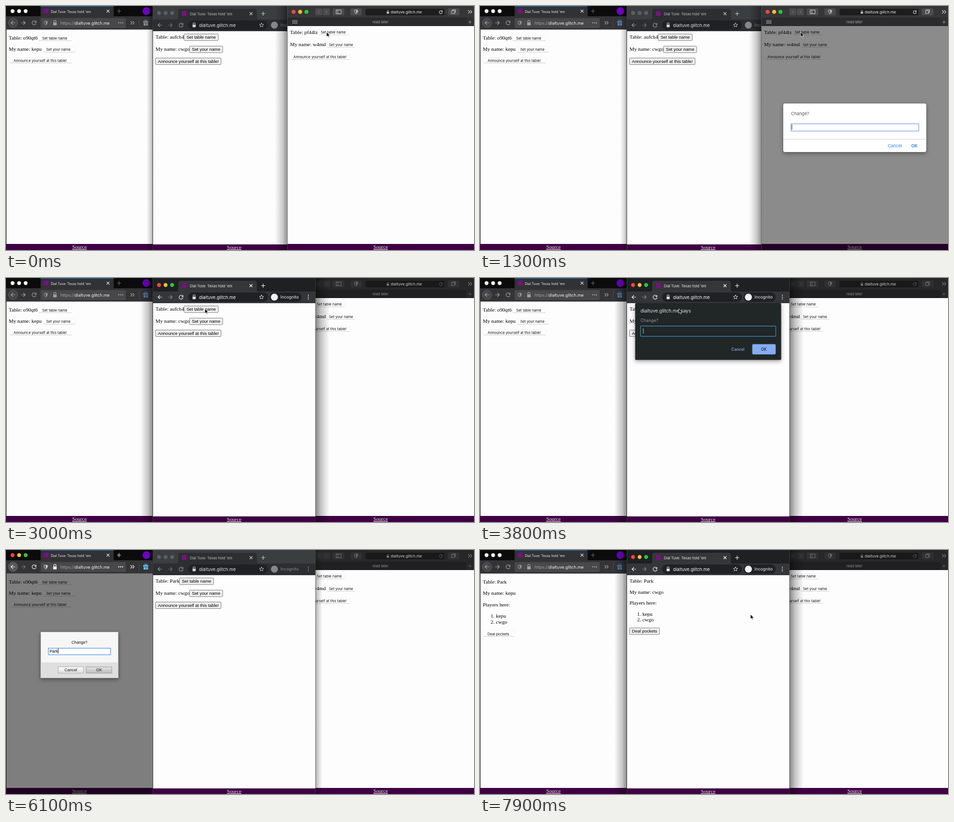
Write an HTML page that moves like this. It is 1000 px wide and 523 px high and loops after 8000 ms.

```html
<!DOCTYPE html>
<html lang="en">
<head>
<meta charset="utf-8">
<title>Three browsers at one table</title>
<style>
html, body { margin: 0; width: 100%; height: 100%; overflow: hidden; background: #000; }
svg { display: block; width: 100vw; height: 100vh; }
text { white-space: pre; }
.ui { font-family: Inter, "Open Sans", sans-serif; }
.serif { font-family: "Liberation Serif", serif; }
.sans { font-family: "Liberation Sans", sans-serif; }
</style>
</head>
<body>
<svg id="stage" viewBox="0 0 1000 523" xmlns="http://www.w3.org/2000/svg">
  <defs>
    <linearGradient id="shadeRight">
      <stop offset="0" stop-opacity="1"/><stop offset=".4" stop-opacity=".46"/><stop offset="1" stop-opacity="0"/>
    </linearGradient>
    <linearGradient id="shadeLeft" x1="1" x2="0">
      <stop offset="0" stop-opacity="1"/><stop offset=".4" stop-opacity=".46"/><stop offset="1" stop-opacity="0"/>
    </linearGradient>
    <linearGradient id="metal" x2="0" y2="1">
      <stop offset="0" stop-color="#fff"/><stop offset="1" stop-color="#dcdcdc"/>
    </linearGradient>
    <linearGradient id="metalDark" x2="0" y2="1">
      <stop offset="0" stop-color="#e4e4e4"/><stop offset="1" stop-color="#bdbdbd"/>
    </linearGradient>
    <filter id="drop" x="-10%" y="-20%" width="120%" height="150%" color-interpolation-filters="sRGB">
      <feDropShadow dx="0" dy="3" stdDeviation="4" flood-opacity=".38"/>
    </filter>
  </defs>
  <g id="scene"></g>
</svg>
<script>
const LOOP = 8000, STEP = 100;
const TITLE = "Dial Tuve: Texas hold 'em", HOST = "dialtuve.glitch.me";
const PLAYERS = { firefox: "kepu", chrome: "cwgo", safari: "w4md" };
const PAGE = "#fdfdfd";
const scene = document.getElementById("scene");

// Drawing helpers
const rect = (x, y, w, h, fill, more = "") =>
  `<rect x="${x}" y="${y}" width="${w}" height="${h}" fill="${fill}" ${more}/>`;
const circle = (x, y, r, fill, more = "") =>
  `<circle cx="${x}" cy="${y}" r="${r}" fill="${fill}" ${more}/>`;
const line = (d, color, width = 1.2, more = "") =>
  `<path d="${d}" fill="none" stroke="${color}" stroke-width="${width}" ${more}/>`;
const text = (x, y, s, size, fill, font = "ui", more = "") =>
  `<text x="${x}" y="${y}" font-size="${size}" fill="${fill}" class="${font}" ${more}>${s}</text>`;
const fade = (opacity, s) => `<g opacity="${opacity}">${s}</g>`;
const middle = 'text-anchor="middle"';

// Icons
const arrow = (x, y, dir, c) =>
  line(`M${x - 4.5 * dir} ${y}H${x + 4 * dir}M${x} ${y - 4}L${x + 4.3 * dir} ${y}L${x} ${y + 4}`, c);
const reload = (x, y, r, c) =>
  line(`M${x + r * .8} ${y - r * .6}A${r} ${r} 0 1 0 ${x + r} ${y + 1}M${x + r} ${y - r}v${r * .8}h${-r * .8}`, c);
const cross = (x, y, r, c) =>
  line(`M${x - r} ${y - r}l${2 * r} ${2 * r}m0 ${-2 * r}l${-2 * r} ${2 * r}`, c);
const plus = (x, y, r, c) => line(`M${x - r} ${y}h${2 * r}M${x} ${y - r}v${2 * r}`, c);
const chevrons = (x, y, c) =>
  line(`M${x - 4} ${y - 3.5}l3.5 3.5l-3.5 3.5m4.5 -7l3.5 3.5l-3.5 3.5`, c);
const lock = (x, y, s, c) =>
  rect(x - 3 * s, y - s, 6 * s, 5 * s, c, 'rx=".6"') +
  line(`M${x - 2 * s} ${y - s}v${-1.5 * s}a${2 * s} ${2 * s} 0 0 1 ${4 * s} 0v${1.5 * s}`, c, s);
const shield = (x, y, c) =>
  line(`M${x} ${y - 4.5}l3.8 1.2c0 4 -1 6 -3.8 7.8c-2.8 -1.8 -3.8 -3.8 -3.8 -7.8z`, c, 1) +
  `<path d="M${x} ${y - 3.5}v6.5c2 -1.5 2.7 -3 2.7 -5.7z" fill="${c}"/>`;
const star = (x, y, c) => {
  const points = Array.from({ length: 10 }, (_, i) => {
    const a = i * Math.PI / 5, r = i % 2 ? 2.2 : 4.8;
    return `${x + r * Math.sin(a)},${y - r * Math.cos(a)}`;
  });
  return `<polygon points="${points.join(" ")}" fill="none" stroke="${c}"/>`;
};
const lights = (xs, y, r, active, idle) =>
  xs.map((x, i) => circle(x, y, r, active ? ["#fc4640", "#fdbc2e", "#28c840"][i] : idle)).join("");
const pointer = (x, y) =>
  `<path transform="translate(${x} ${y})" d="M0 0V9.8L2.3 7.8L3.9 11.3L5.4 10.6L3.9 7.3H7z"
    fill="#000" stroke="#fff" stroke-width=".7"/>`;

function sideShade(x, width, opacity, side) {
  const left = side === "Left" ? x - width : x;
  return rect(left, 0, width, 523, `url(#shade${side})`, `opacity="${opacity}"`);
}

// Page parts
const words = (x, y, s) => text(x, y, s, 11.2, "#000", "serif");
const footer = (x, y, w, mid) =>
  rect(x, y, w, 523 - y, "#400044") +
  text(mid, y + 10, "Source", 11.2, "#f0e6f2", "serif", middle + ' text-decoration="underline"');
const softButton = (x, y, w, label, pad) =>
  rect(x, y, w, 11, "#fff", 'rx="2" stroke="#ededed" stroke-width=".7"') +
  line(`M${x + 1} ${y + 11.2}h${w - 2}`, "#c4c4c4", .8) +
  text(x + pad, y + 8.5, label, 7.6, "#111");
const hardButton = (x, y, w, label) =>
  rect(x + .5, y + .5, w - 1, 14, "#efefef", 'rx="1.5" stroke="#777"') +
  text(x + w / 2, y + 10.7, label, 9.33, "#000", "sans", middle);
const numbered = (x, y, gap, names) =>
  names.map((name, i) => words(x, y + gap * i, `${i + 1}. ${name}`)).join("");

// Typed word followed by a caret; widths in em by letter count
const typedWidth = s => [0, .667, 1.223, 1.556, 2.056][s.length];
const entry = (x, y, s, size, c) =>
  text(x, y, s, size, c, "sans") + rect(x + typedWidth(s) * size, y - 9, .9, 11, c);

function firefox(s) {
  const on = s.front === "firefox", ink = on ? "#f4f4f5" : "#a2a2a5";
  let out = rect(0, 0, 314, 523, "#0b0b0c") +
    lights([14, 28, 42], 11, 4.2, on, "#f2f2f2") +
    rect(74, 0, 156, 22, "#323235") + rect(74, 0, 156, 1, "#0a7cf0") +
    rect(81, 6, 10, 10, "#7a1080") +
    text(96, 14.5, TITLE, 7.1, "#f2f2f2") + cross(218, 11, 3.2, "#eee") +
    plus(241.5, 11, 4.5, on ? "#ddd" : "#6a6a6c") + circle(300, 11, 8.2, "#6f00c8") +
    rect(0, 22, 314, 28.5, "#343437") +
    circle(15, 36, 10, on ? "#57575a" : "#464649", 'stroke="#68686b" stroke-width=".8"') +
    arrow(15, 36, -1, ink) + arrow(37, 36, 1, on ? "#78787b" : ink) + reload(60, 36, 4.3, ink) +
    rect(74, 26, 182, 21, "#48484b", 'rx="2"') +
    shield(85, 36.5, ink) + line("M95.5 31v11", "#68686b", .8) + lock(104.5, 36.5, 1.25, ink) +
    text(116, 39.7, `https://<tspan fill="#f5f5f5">${HOST}</tspan>`, 9, "#a5a5a8") +
    [241, 245, 249].map(x => circle(x, 36, 1.3, ink)).join("") +
    chevrons(270, 36, ink) + line("M284.5 27v18", "#515154", .8);
  const gift = on ? "#62c4ff" : s.t < 1300 ? "#888c92" : "#4f7fae";
  out += rect(293, 32.5, 11, 3, gift) + rect(294, 36.5, 4.3, 5.5, gift) + rect(299.3, 36.5, 4, 5.5, gift) +
    line("M298.5 32l-3 -2.5m3.5 2.5l3 -2.5", gift);
  out += rect(1, 50.5, 312.5, 460, PAGE) +
    words(6, 72, `Table: ${s.firefoxTable}`) + words(6, 96, `My name: ${PLAYERS.firefox}`);
  if (s.firefoxPlayers.length) {
    const bottom = 174 - 13 * (2 - s.firefoxPlayers.length);
    out += words(6, 121, "Players here:") + numbered(22.8, 145, 13, s.firefoxPlayers) +
      softButton(6.5, bottom, 67, "Deal pockets", 9.5);
  } else {
    out += softButton(s.firefoxTable === "Park" ? 59 : 69, 63, 72, "Set table name", 8.3) +
      softButton(78.5, 87.7, 70, "Set your name", 7.5) +
      softButton(7, 111, 134, "Announce yourself at this table!", 9.3);
  }
  out += footer(0, 510, 314, 157);
  if (s.firefoxDialog) {
    out += rect(1, 50.5, 312.5, 472.5, "#000", 'opacity=".5"') + fade(s.firefoxDialog,
      rect(74, 175.5, 166, 99, "#f6f6f6", 'stroke="#777" stroke-width=".6" filter="url(#drop)"') +
      rect(74, 241, 166, 33, "#dfdfdf") +
      text(157, 200.5, "Change?", 8.4, "#111", "sans", middle) +
      rect(90.5, 210.5, 133, 14, "#fff", 'stroke="#4c98e6" stroke-width="1.3"') +
      entry(93, 220, s.firefoxTyped, 8.8, "#000") +
      rect(111.5, 250.5, 54, 13.5, "url(#metal)", 'stroke="#999" stroke-width=".8"') +
      rect(171.5, 250.5, 54.5, 13.5, "url(#metalDark)", 'stroke="#858585" stroke-width=".8"') +
      text(138.5, 260, "Cancel", 8.6, "#111", "sans", middle) +
      text(199, 260, "OK", 8.6, "#111", "sans", middle));
  }
  return out + rect(313.3, 0, .9, 523, "#333");
}

function chrome(s) {
  const on = s.front === "chrome", ink = on ? "#f1f3f4" : "#96999c";
  const bar = on ? "#35363a" : "#2c2e31";
  let out = sideShade(314, on ? 27 : 14, on ? .45 : .32, "Left") +
    sideShade(661, on ? 30 : 15, on ? .48 : .35, "Right") +
    rect(314, 0, 347, 523, on ? "#1f2023" : "#3b3e41") +
    lights([327, 341, 355], 15, 4.2, on, "#5d6063") +
    `<path d="M364 29q4 0 4 -4V11q0 -5 5 -5H531q5 0 5 5V25q0 4 4 4z" fill="${bar}"/>` +
    rect(376, 11, 10, 10, "#7a1080") +
    text(393, 19.5, TITLE, 7.55, on ? "#eee" : "#bdbfc1") +
    cross(523.5, 16.5, 3, on ? "#fff" : "#c8cacc") + plus(549.5, 16.5, 4.3, on ? "#fff" : "#c8cacc") +
    rect(314, 29, 347, 25, bar) +
    arrow(329, 41, -1, ink) + arrow(351, 41, 1, on ? "#85888b" : "#707376") + reload(374, 41, 4.2, ink) +
    rect(389, 31, 171, 20, on ? "#202124" : "#1f2124", 'rx="10"') +
    lock(402, 41, 1.1, on ? "#e0e0e0" : "#d5d7d9") + text(412.5, 44.6, HOST, 9.45, on ? "#fff" : "#e4e6e8") +
    star(546, 41, on ? "#ddd" : "#c4c6c8") +
    rect(563, 31, 69, 20, on ? "#202124" : bar, 'rx="10"') + circle(573.5, 41, 7.5, on ? "#f1f3f4" : "#85888b") +
    text(586.5, 44.4, "Incognito", 8.9, on ? "#f1f3f4" : "#85888b") +
    [37, 41, 45].map(y => circle(646, y, 1.1, ink)).join("") +
    rect(314, 54, 347, 457, PAGE);
  const me = PLAYERS.chrome;
  if (s.chromePlayers.length) {
    out += words(319.5, 69.7, `Table: ${s.chromeTable}`) + words(319.5, 93.5, `My name: ${me}`) +
      words(319.5, 117, "Players here:") + numbered(335.7, 140.5, 12.7, s.chromePlayers) +
      hardButton(319, 166.5, 65, "Deal pockets");
  } else {
    out += words(319.5, 70.3, `Table: ${s.chromeTable}`) + words(319.5, 96.3, `My name: ${me}`) +
      hardButton(s.chromeTable === "Park" ? 370 : 380, 59.5, 74, "Set table name") +
      hardButton(391.5, 85.5, 72, "Set your name") +
      hardButton(319, 111, 141, "Announce yourself at this table!");
  }
  out += footer(314, 511, 347, 487.5);
  if (s.chromeDialog) {
    out += fade(s.chromeDialog,
      rect(331.5, 54, 312, 121.5, "#212627", 'rx="2" filter="url(#drop)"') +
      text(343, 73.5, HOST + " says", 10, "#e4e6e8") + text(343, 94, "Change?", 9.1, "#92979b") +
      rect(343, 103, 289, 22, "#212627", 'rx="1.5" stroke="#3a87b0" stroke-width="1.4"') +
      entry(348.5, 117, s.chromeTyped, 9.4, "#e4e4e4") +
      text(551, 156, "Cancel", 8.3, "#7b9fdc", "ui", middle + ' font-weight="600"') +
      rect(582, 142, 49.5, 21.5, "#86acf2", 'rx="2" stroke="#5f93c4"') +
      text(606.5, 156, "OK", 8.3, "#26384f", "ui", middle + ' font-weight="600"'));
  }
  return out + line("M313.9 0V523M661.2 0V523", "#555", .6);
}

function safari(s) {
  const on = s.front === "safari", ink = on ? "#d5d5d5" : "#777";
  const key = on ? "#4b4b4d" : "#303032";
  const pill = (x, w) => rect(x, 5, w, 15, key, 'rx="2.5"');
  let out = (on ? sideShade(601, 26, .42, "Left") : "") +
    rect(601, 0, 399, 26, on ? "#363638" : "#272729") + rect(601, 26, 399, 17, on ? "#2b2b2d" : "#202022") +
    line("M601 26h399", "#1c1c1d", .8) +
    lights([614.5, 628.5, 642], 12.5, 4.3, on, "#4a4a4a") +
    pill(661, 15) + pill(677, 15) + line("M670 9.5l-3 3l3 3M683 9.5l3 3l-3 3", on ? "#858585" : "#555", 1) +
    pill(698, 25) + rect(705.5, 8.5, 10.5, 8, "none", `stroke="${ink}"`) + line("M709 8.5v8", ink, 1) +
    pill(736, 24) + shield(748, 12.5, ink) +
    rect(768, 6, 169, 14, on ? "#1d1d1e" : "#19191a", 'rx="3"') +
    lock(816, 13, .85, on ? "#c4c4c4" : "#777") + text(822, 16, HOST, 8, on ? "#f0f0f0" : "#d2d2d2") +
    reload(929, 13, 3.3, on ? "#ccc" : "#4a4a4a") +
    pill(944, 25) + rect(952, 10, 6.5, 6, "none", `stroke="${ink}"`) +
    line("M954 9.5v-1.5h6.5v6h-2", ink, 1) + chevrons(991.5, 12.5, ink) +
    rect(984, 26, 16, 17, on ? "#303032" : "#272729") + plus(991.5, 34.5, 3.5, on ? "#929292" : "#555");
  for (let i = 0; i < 12; i++)
    out += rect(612 + i % 4 * 2.9, 30.5 + Math.floor(i / 4) * 2.9, 1.6, 1.6, ink);
  out += text(800, 37, "read later", 7.6, on ? "#aaa" : "#8e8e8e", "ui", middle) +
    rect(601, 43, 399, 467.5, PAGE) +
    words(607, 60, `Table: ${s.safariTable}`) + words(607, 86, `My name: ${PLAYERS.safari}`) +
    softButton(s.safariTable === "Park" ? 659.5 : 668, 50.7, 64.5, "Set table name", 4.4) +
    softButton(685.5, 77.3, 61.5, "Set your name", 4.4) +
    softButton(609, 103.5, 125, "Announce yourself at this table!", 5) +
    footer(601, 510, 399, 800.5);
  if (s.safariDialog) {
    out += fade(s.safariDialog,
      rect(601, 43, 399, 480, "#000", 'opacity=".45"') +
      rect(648, 209, 305.5, 104, "#fff", 'rx="4" filter="url(#drop)"') +
      text(664.5, 234, "Change?", 9.3, "#555") +
      rect(664.5, 252.5, 273, 15.5, "#fff", 'stroke="#6f97d8" stroke-width="1.2"') +
      entry(666, 263, s.safariTyped, 9.3, "#111") + line("M648 285.5h305.5", "#c9c9c9", .9) +
      text(886.5, 303, "Cancel", 9.3, "#2a86ee", "ui", middle) +
      text(928.3, 303, "OK", 9.3, "#1d7df0", "ui", middle + ' font-weight="600"'));
  }
  return out + rect(600.8, 0, .8, 523, "#555");
}

const between = (t, a, b) => t >= a && t < b;
const appear = (t, a, b) => between(t, a, b) ? (t < a + STEP ? .55 : 1) : 0;
const typed = (t, start) => t < start ? "" : t < start + 100 ? "P" : t < start + 200 ? "Par" : "Park";

// Pointer path: time, x, y
const PATH = [
  [0, 685, 56], [2400, 685, 56], [2800, 425, 66], [4500, 425, 66], [4900, 221, 98],
  [5100, 221, 98], [5400, 124, 70], [6400, 124, 70], [6700, 80, 114],
  [7100, 80, 114], [7400, 400, 117], [7500, 400, 117], [7900, 578, 138]
];
const HIDDEN = [[1500, 2400], [4100, 4500], [6000, 6400]];

function pointerAt(t) {
  if (HIDDEN.some(([a, b]) => between(t, a, b))) return "";
  const i = PATH.findIndex(p => p[0] > t);
  if (i < 0) return pointer(...PATH[PATH.length - 1].slice(1));
  const [t0, x0, y0] = PATH[i - 1], [t1, x1, y1] = PATH[i];
  const k = (t - t0) / (t1 - t0), e = k * k * (3 - 2 * k);
  return pointer(x0 + (x1 - x0) * e, y0 + (y1 - y0) * e);
}

function stateAt(t) {
  const { firefox: first, chrome: second } = PLAYERS;
  return {
    t,
    front: t < 2800 ? "safari" : between(t, 5300, 7300) ? "firefox" : "chrome",
    safariDialog: appear(t, 800, 2100),
    chromeDialog: appear(t, 3300, 4500),
    firefoxDialog: appear(t, 5600, 6300),
    safariTyped: typed(t, 1500),
    chromeTyped: typed(t, 4100),
    firefoxTyped: typed(t, 5900),
    safariTable: t < 2400 ? "pf44lz" : "Park",
    chromeTable: t < 4500 ? "aufch4" : "Park",
    firefoxTable: t < 6300 ? "o90qt6" : "Park",
    firefoxPlayers: t < 6800 ? [] : t < 7500 ? [first] : [first, second],
    chromePlayers: t < 7500 ? [] : [first, second]
  };
}

const ORDER = {
  safari: [firefox, chrome, safari],
  chrome: [firefox, safari, chrome],
  firefox: [safari, chrome, firefox]
};

let shown = -1;
function draw(now) {
  const t = Math.floor(now % LOOP / STEP) * STEP;
  if (t !== shown) {
    const state = stateAt(t);
    scene.innerHTML = ORDER[state.front].map(paint => paint(state)).join("") + pointerAt(t);
    shown = t;
  }
}

const start = performance.now();
function tick() {
  draw(performance.now() - start);
  requestAnimationFrame(tick);
}
tick();
</script>
</body>
</html>
```
